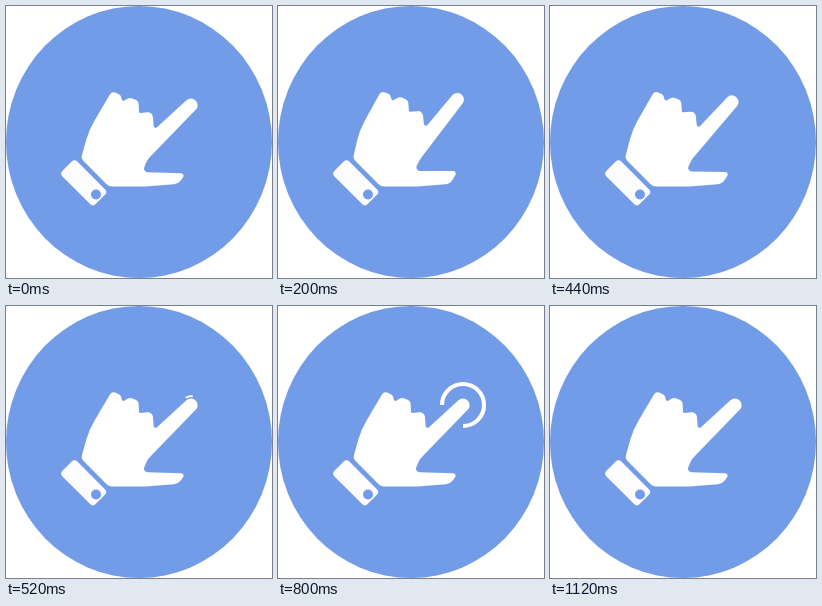
Recreate the animation shown at these times as an HTML page with a canvas. Size 266 px wide and 272 px high, loop 1.92 s.

```html
<!DOCTYPE html>
<html lang="en">
<head>
<meta charset="utf-8">
<title>Tap gesture</title>
<style>
html, body { margin: 0; width: 100%; height: 100%; overflow: hidden; background: #fff; }
canvas { display: block; width: 266px; height: 272px; }
</style>
</head>
<body>
<canvas id="stage" width="266" height="272"></canvas>
<script>
const ctx = document.getElementById('stage').getContext('2d');
const LOOP = 1920, STEP = 40;
const BLUE = '#739ce8', WHITE = '#fff', CUFF = '#fcfcff';
const TIP = { x: 185, y: 99, r: 6.4 };

const clamp = v => Math.max(0, Math.min(1, v));
const ease = v => (1 - Math.cos(Math.PI * clamp(v))) / 2;
const rad = deg => deg * Math.PI / 180;

function turn(x, y, cx, cy, angle) {
  const c = Math.cos(angle), s = Math.sin(angle);
  x -= cx;
  y -= cy;
  return [cx + x * c - y * s, cy + x * s + y * c];
}

function disc(x, y, rx, ry, color) {
  ctx.fillStyle = color;
  ctx.beginPath();
  ctx.ellipse(x, y, rx, ry, 0, 0, 2 * Math.PI);
  ctx.fill();
}

// Corners are [x, y, radius].
function roundedShape(corners) {
  const [first] = corners, last = corners[corners.length - 1];
  ctx.fillStyle = WHITE;
  ctx.beginPath();
  ctx.moveTo((first[0] + last[0]) / 2, (first[1] + last[1]) / 2);
  corners.forEach(([x, y, r], i) => {
    const [nx, ny] = corners[(i + 1) % corners.length];
    ctx.arcTo(x, y, nx, ny, r);
  });
  ctx.fill();
}

function drawCuff() {
  ctx.save();
  ctx.translate(77.7, 176.8);
  ctx.rotate(rad(45));
  ctx.fillStyle = CUFF;
  ctx.beginPath();
  ctx.roundRect(-23.5, -10.5, 47, 21, 4);
  ctx.fill();
  ctx.restore();
  disc(90, 188.5, 5, 5, BLUE);
}

// Corner of the square end around the fingertip, facing the given angle.
function tipCorner(deg) {
  const d = TIP.r * Math.SQRT2;
  return [TIP.x + d * Math.cos(rad(deg)), TIP.y + d * Math.sin(rad(deg)), TIP.r - 0.2];
}

function drawHand(lift) {
  const swing = ([x, y, r]) => [...turn(x, y, 97, 178, -0.038 * lift), r];
  const bend = ([x, y, r]) => swing([...turn(x, y, 148, 134, -0.12 * lift), r]);
  const wrist = [[103, 180.5, 8], [75, 152.5, 5]];
  const knuckles = [
    [83, 124, 80], [106, 85, 4.5], [114.5, 89, 4], [116.5, 95.5, 1.5],
    [124, 91.5, 5], [132.5, 95, 5], [133, 107, 1.5], [146.5, 106, 5], [148, 124, 2]
  ];
  const finger = [tipCorner(-89), tipCorner(1), [141, 154, 20]];
  const thumb = [[136.5, 166, 3.5], [180, 167.5, 2.5]];
  const heel = [[172, 178, 9], [140, 180.5, 60]];
  roundedShape([
    ...wrist, ...knuckles.map(swing), ...finger.map(bend), ...thumb.map(swing), ...heel
  ]);
}

function drawRing(t) {
  if (t < 520 || t >= 1120) return;
  const outer = 25 - 0.0475 * Math.abs(t - 840);
  const width = 0.18 * outer;
  const grow = Math.sqrt(clamp((t - 515) / 165));
  const start = 246 - 66 * grow;
  ctx.strokeStyle = WHITE;
  ctx.lineWidth = width;
  ctx.beginPath();
  ctx.arc(TIP.x, TIP.y, outer - width / 2, rad(start), rad(start + 270 * grow));
  ctx.stroke();
}

function draw(now) {
  const t = Math.floor((now % LOOP) / STEP) * STEP;
  const lift = t < 320 ? ease(t / 300) : 1 - ease((t - 340) / 180);
  ctx.fillStyle = WHITE;
  ctx.fillRect(0, 0, 266, 272);
  disc(133, 136, 133, 136, BLUE);
  drawCuff();
  drawHand(lift);
  drawRing(t);
}

let begin;
function tick(now) {
  if (begin === undefined) begin = now;
  draw(Math.max(0, now - begin));
  requestAnimationFrame(tick);
}
draw(0);
requestAnimationFrame(tick);
</script>
</body>
</html>
```
